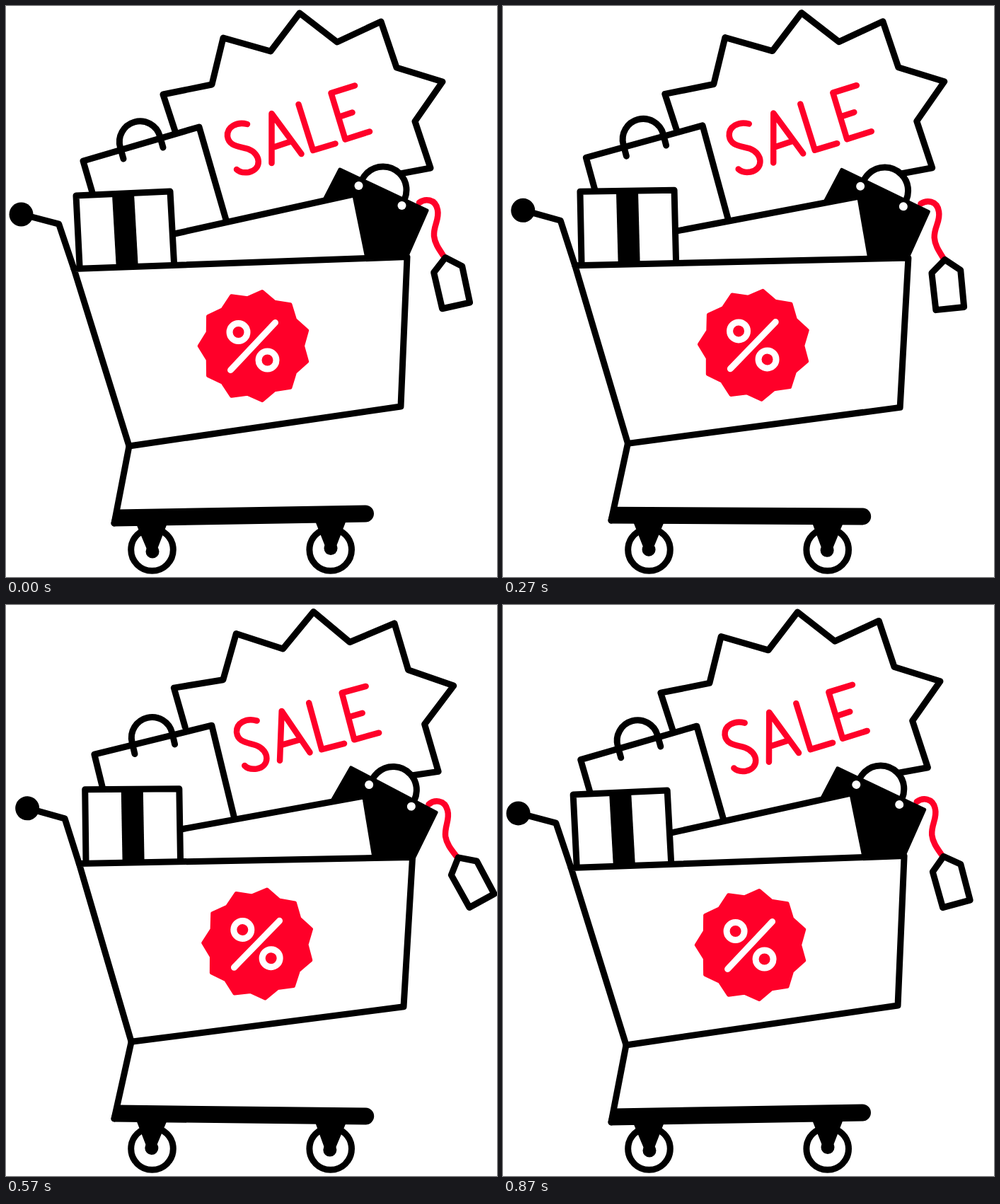
These frames come from a looping animation (694x807 px, 900 ms). An HTML page:

```html
<!DOCTYPE html>
<html lang="en">
<head>
<meta charset="utf-8">
<title>Sale cart</title>
<style>
  html, body { margin: 0; width: 100%; height: 100%; overflow: hidden; background: #fff; }
  svg { display: block; width: 694px; height: 807px; }
  .line { fill: none; stroke: #000; stroke-width: 9; stroke-linecap: round; stroke-linejoin: round; }
  .white { fill: #fff; }
  .solid { fill: #000; }
  .red { fill: none; stroke: #ff0029; stroke-width: 8.5; stroke-linecap: round; stroke-linejoin: round; }
  .mark { fill: none; stroke: #fff; stroke-width: 9; stroke-linecap: round; }
</style>
</head>
<body>
<svg viewBox="0 0 694 807" role="img" aria-label="Shopping cart with a SALE sign">
  <g id="load">
    <g id="sign">
      <path class="line white" d="M240 180L222 125 291 111 307 45 374 64 415 10 468 51 530 22 552 87 617 107 578 163 600 229 552 238"/>
      <g class="red" aria-label="SALE">
        <path d="M341 167C326 163 312 171 313 184C315 199 330 198 342 202C361 209 362 231 343 235C336 236 330 235 326 231"/>
        <path d="M375.500 222L375.500 152 417.500 209M377 200L404 191"/>
        <path d="M413.500 139L434 204 465.500 194.500"/>
        <path d="M493 112.500L459.500 123 479.500 188.500 514 177.500M470 157L489.500 150.500"/>
      </g>
    </g>
    <g id="darkBag">
      <g id="string">
        <path class="red" d="M584 278C592 272 607 272 610 288C613 302 604 310 605 325C606 336 613 345 619 354"/>
        <path id="tag" class="line white" d="M0 1L-20.500 18 -20 70.500 20 70.500 20.500 18Z"/>
      </g>
      <circle class="line white" cx="533" cy="260" r="33"/>
      <path d="M472 231L595 289 548 396 440 330 440 293Z" stroke="#000" stroke-width="5" stroke-linejoin="round"/>
      <circle class="white" cx="498.500" cy="254" r="6"/>
      <circle class="white" cx="559.500" cy="282" r="6"/>
    </g>
    <g id="lightBag">
      <path class="line white" d="M135 308L109 219 273 171 317 323"/>
      <path class="line" d="M166 216L161.500 200A29 29 0 0 1 217.500 184L222 200"/>
    </g>
  </g>
  <path id="parcel" class="line white" d="M180 335L238 322 493.500 265.500 514 366 240 372"/>
  <g id="gift">
    <path class="line white" d="M99 268L232 262 238 372 104.500 377Z"/>
    <path d="M150 267L181 265 187 372 156 373Z"/>
  </g>
  <g id="basket">
    <path class="line white" d="M96 371.500L567 354.500 558 566 174 622Z"/>
    <path class="line" d="M21 294L74.700 308.200 96 371.500"/>
    <circle cx="21.500" cy="294.500" r="17"/>
    <path id="badge" fill="#ff0029" stroke="#ff0029" stroke-width="5" stroke-linejoin="round"/>
    <g class="mark">
      <circle cx="328.500" cy="461" r="12.500"/>
      <circle cx="369.500" cy="500.500" r="12.500"/>
      <path d="M317.500 514.500L380.500 447.500"/>
    </g>
  </g>
  <g class="line white">
    <circle cx="206.500" cy="768.500" r="29.800"/>
    <circle cx="458.700" cy="768.500" r="29.800"/>
  </g>
  <g id="base">
    <path class="line" d="M174 622L153 731"/>
    <path class="line solid" d="M157 716L508 710A7.500 7.500 0 0 1 508 725L153 731Z"/>
    <path d="M184 732L228 731 213 770 200 770ZM437 728L481 727 466 766 452 766Z"/>
    <circle cx="207" cy="771" r="9.500"/>
    <circle cx="459" cy="766.500" r="9.500"/>
  </g>
</svg>
<script>
const LOOP = 900, STEP = 30, RAD = Math.PI / 180;
const el = id => document.getElementById(id);

// id: pivot x, pivot y, swing in degrees, lag in degrees of the cycle
const SWINGS = {
  basket: [454, 807, 0.575, 0],
  load: [454, 807, 0.575, 0],
  base: [331, 728, 0.97, 0],
  gift: [299, 600, 1.3, 0],
  parcel: [390, 640, 1.3, 0],
  sign: [420, 303, 1.1, 77],
  lightBag: [200, 445, 0.9, 48],
  darkBag: [535, 455, 1.03, 60],
  string: [584, 278, -4.3, 66]
};

function badgePath(cx, cy, points, outer, inner) {
  const pts = [];
  for (let i = 0; i < points * 2; i++) {
    const a = Math.PI + i * Math.PI / points, r = i % 2 ? inner : outer;
    pts.push((cx + r * Math.cos(a)).toFixed(2) + ' ' + (cy + r * Math.sin(a)).toFixed(2));
  }
  return 'M' + pts.join('L') + 'Z';
}

function draw(ms) {
  const phase = Math.floor(ms % LOOP / STEP) * STEP / LOOP * 360;
  const wave = lag => Math.cos((phase - lag) * RAD);
  const angle = {};
  for (const id in SWINGS) {
    const [x, y, swing, lag] = SWINGS[id];
    angle[id] = swing * (Math.cos(lag * RAD) - wave(lag));
    el(id).setAttribute('transform', `rotate(${angle[id]} ${x} ${y})`);
  }
  // The tag's tilt is absolute, so undo the turns it inherits.
  const tilt = 13.2 * wave(72) - 16.6 - angle.load - angle.darkBag - angle.string;
  el('tag').setAttribute('transform', `translate(620.8 354.6) rotate(${tilt})`);
}

el('badge').setAttribute('d', badgePath(351, 480.5, 11, 77.8, 68.5));

function tick() {
  draw(performance.now());
  requestAnimationFrame(tick);
}
tick();
</script>
</body>
</html>
```
